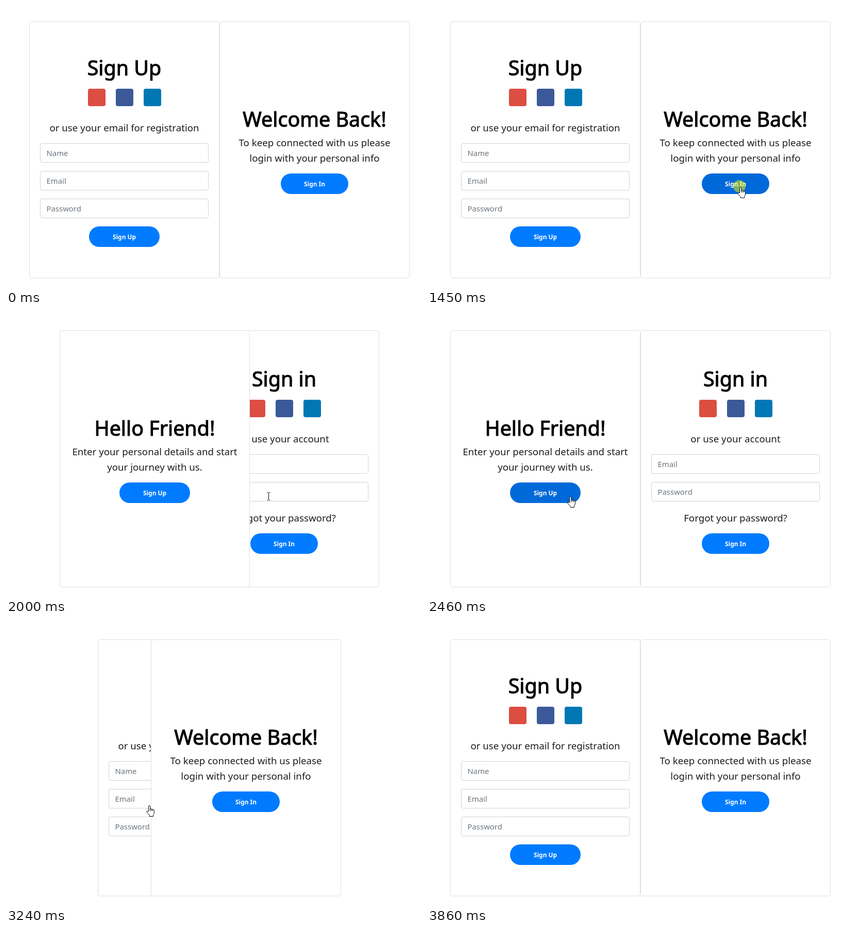
An HTML page that plays this animation: 805 by 547 pixels, repeating every 4.8 s.

```html
<!DOCTYPE html>
<html lang="en">
<head>
<meta charset="utf-8">
<title>Sign in and sign up slider</title>
<style>
  html, body { margin: 0; width: 100%; height: 100%; overflow: hidden; background: #fff; }
  svg { display: block; width: 805px; height: 547px; font-family: "Noto Sans", "Open Sans", sans-serif; }
  .card { fill: #fff; stroke: #dfdfdf; }
  /* regular weight thickened to a semibold */
  .title { font-size: 39.4px; text-anchor: middle; stroke: #000; stroke-width: 1.1px; }
  .lead { font-size: 18.7px; text-anchor: middle; fill: #1c1c1c; }
  .field { fill: #fff; stroke: #ced4da; }
  .hint { font-size: 14.9px; fill: #6c757d; }
  .btn { fill: #007bff; }
  .hover .btn { fill: #0069d9; }
  .pressed .btn { fill: #0062cc; }
  .ring { fill: #80bdff; visibility: hidden; }
  .focus .ring { visibility: inherit; }
  .label { font-size: 11.9px; font-weight: 700; fill: #fff; text-anchor: middle; }
  .cursor { fill: #fff; stroke: #000; stroke-linejoin: round; }
</style>
</head>
<body>
<svg viewBox="0 0 805 547">
  <g id="form"></g>
  <g id="panel"></g>
  <circle id="click" r="12" fill="#ff0" fill-opacity=".5"/>
  <g id="arrow" class="cursor"><path d="M.5 .5V16.5L4.2 13 6.7 18.7 9 17.7 6.5 12H11.5Z"/></g>
  <g id="hand" class="cursor">
    <path d="M-1.5 12V2.2a1.6 1.6 0 0 1 3.2 0V7q1.5-.8 2.6.5 1.6-.6 2.5.7 2.2-.5 2.7 1.3V14q0 2.5-2 4.5V21.5H.5V19.5L-5 13.5q-.5-2 1.5-2.2Z"/>
    <path d="M1.7 7V11M4.3 7.5V11M6.8 8.2V11" fill="none"/>
  </g>
  <g id="beam" class="cursor"><path d="M-2.5 -6.5H-.5L.5 -5.5 1.5 -6.5H3.5M.5 -5.5V7.5M-2.5 8.5H-.5L.5 7.5 1.5 8.5H3.5" fill="none"/></g>
</svg>
<script>
const LOOP = 4800, TICK = 77.8, FIRST = 200;
const SLIDE = 568, OPEN = 1579, CLOSE = 2903;
const LEFT = 45, WIDTH = 369, MID = WIDTH / 2;
const $ = id => document.getElementById(id);

// Markup helpers; x is relative to the card
const card = `<rect class="card" x=".5" y="30.5" width="${WIDTH - 1}" height="499" rx="4"/>`;
const text = (kind, y, s) => `<text class="${kind}" x="${MID}" y="${y}">${s}</text>`;
const field = (y, s) =>
  `<rect class="field" x="21.5" y="${y + .5}" width="326" height="37" rx="3.5"/>
   <text class="hint" x="33.5" y="${y + 25}">${s}</text>`;
const icons = y => ["#dc4e41", "#3b5998", "#0077b5"].map((c, i) =>
  `<rect x="${114 + 54 * i}" y="${y}" width="34" height="34" rx="4" fill="${c}"/>`).join("");
const pill = (cls, w, y, grow) =>
  `<rect class="${cls}" x="${MID - w / 2 - grow}" y="${y - grow}" width="${w + 2 * grow}" height="${40 + 2 * grow}" rx="${20 + grow}"/>`;
const button = (y, s) => {
  const w = s === "Sign In" ? 131 : 137;
  return pill("ring", w, y, 3.2) + pill("btn", w, y, 0) + text("label", y + 25, s);
};
const greeting = (title, line1, line2, action) =>
  text("title", 235, title) + text("lead", 273, line1) + text("lead", 303, line2) + button(326, action);

$("form").innerHTML = card +
  `<g id="signUp">${text("title", 135, "Sign Up")}${icons(161)}
   ${text("lead", 244, "or use your email for registration")}
   ${field(267, "Name")}${field(321, "Email")}${field(375, "Password")}${button(429, "Sign Up")}</g>
   <g id="signIn">${text("title", 139, "Sign in")}${icons(165)}
   ${text("lead", 248, "or use your account")}
   ${field(271, "Email")}${field(325, "Password")}
   ${text("lead", 402, "Forgot your password?")}${button(425, "Sign In")}</g>`;
$("panel").innerHTML = card +
  `<g id="welcome">${greeting("Welcome Back!", "To keep connected with us please", "login with your personal info", "Sign In")}</g>
   <g id="hello">${greeting("Hello Friend!", "Enter your personal details and start", "your journey with us.", "Sign Up")}</g>`;

const clamp = v => Math.min(1, Math.max(0, v));
const smooth = u => u * u * (3 - 2 * u);
const within = (t, a, b) => t >= a && t < b;

// cubic-bezier(.42, 0, .58, 1)
function easeInOut(x) {
  x = clamp(x);
  let lo = 0, hi = 1;
  for (let i = 0; i < 24; i++) {
    const s = (lo + hi) / 2, r = 1 - s;
    if (1.26 * s * r * r + 1.74 * s * s * r + s * s * s < x) lo = s; else hi = s;
  }
  return smooth(lo);
}

// Pointer moves: start, end, target x, target y
const moves = [
  [200, 589, 611, 367],
  [900, 1211, 608, 352],
  [1755, 2400, 278, 353],
  [3250, 3770, 706, 535]
];
function pointer(t) {
  let x = 684, y = 485;
  for (const [a, b, tx, ty] of moves) {
    const k = smooth(clamp((t - a) / (b - a)));
    x += (tx - x) * k;
    y += (ty - y) * k;
  }
  return [x, y];
}

function pointerKind(t, x, y, panelX) {
  if (t < FIRST || t >= 3850) return "none";
  if (t < 1755) return y < 366 ? "hand" : "arrow";
  if (t < 2400) return x > panelX + WIDTH ? "beam" : x < 298 ? "hand" : "arrow";
  return t < 3300 ? "hand" : "arrow";
}

const show = (id, on) => $(id).setAttribute("visibility", on ? "visible" : "hidden");
const place = (id, x, y) => $(id).setAttribute("transform", `translate(${Math.round(x)} ${Math.round(y)})`);

function draw(time) {
  // The screen refreshes in coarse ticks
  const t = FIRST + Math.floor((time - FIRST) / TICK) * TICK;
  const pos = easeInOut((t - OPEN) / SLIDE) - easeInOut((t - CLOSE) / SLIDE);
  const swapped = pos > .5;
  const panelX = LEFT + WIDTH * (1 - pos);
  place("form", LEFT + WIDTH * pos, 0);
  place("panel", panelX, 0);
  show("signUp", !swapped);
  show("welcome", !swapped);
  show("signIn", swapped);
  show("hello", swapped);

  const [x, y] = pointer(t);
  const kind = pointerKind(t, x, y, panelX);
  for (const id of ["arrow", "hand", "beam"]) {
    show(id, id === kind);
    place(id, x, y);
  }
  show("click", within(t, 1440, 1590) || within(t, 2760, 2900));
  place("click", x - 2, y - 1);

  const later = t > 1755;
  const focus = swapped ? t > 2830 : within(t, 1500, 2000);
  const panel = $("panel").classList;
  panel.toggle("focus", focus);
  panel.toggle("hover", focus || kind === "hand" && swapped === later);
  panel.toggle("pressed", within(t, 1500, 1640) || within(t, 2830, 2960));
}

const start = performance.now();
function frame() {
  draw((performance.now() - start) % LOOP);
  requestAnimationFrame(frame);
}
frame();
</script>
</body>
</html>
```
